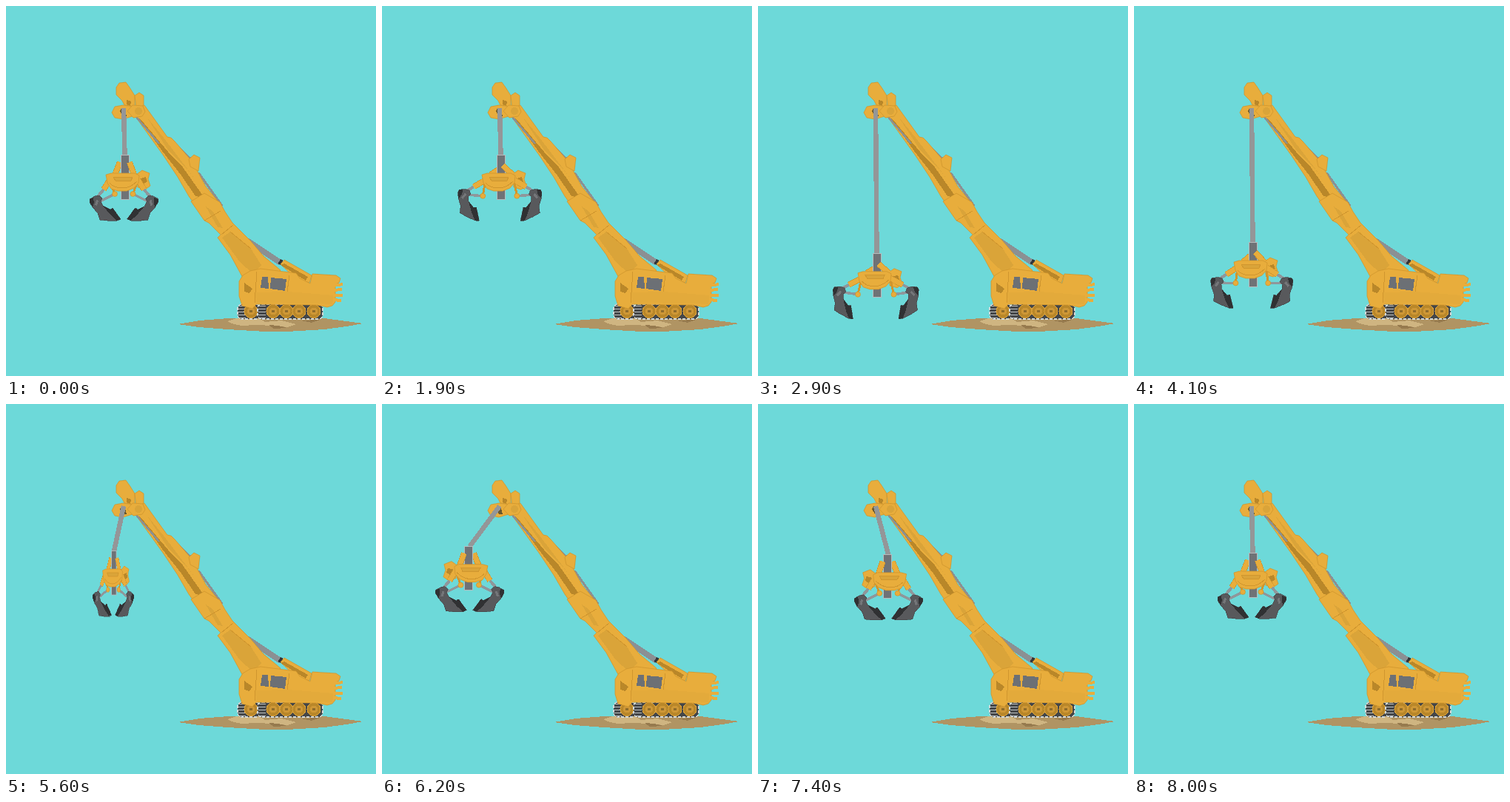
An HTML page for the animation above (9 s loop, 500 by 500 pixels).

```html
<!DOCTYPE html>
<html lang="en">
<head>
<meta charset="utf-8">
<title>Grab crane</title>
<style>
  html, body { margin: 0; width: 100%; height: 100%; overflow: hidden; background: #6dd9d9; }
  svg { display: block; width: 100vw; height: 100vh; shape-rendering: crispEdges; }
  .y { fill: #e8ad3c; stroke: #d0962e; stroke-width: .8; stroke-linejoin: round; }
  .s { fill: #daa439; }
  .d { fill: #b98729; }
  .steel { fill: #6c7075; }
  .line { fill: none; stroke: #8b9093; }
  .edge { fill: none; stroke: #d0962e; }
</style>
</head>
<body>
<svg viewBox="0 0 500 500">
  <g id="ground">
    <path fill="#b09463" d="M232 430 262 425 300 422H430L460 426 483 429 460 433 430 437 380 440H350L300 437 260 434Z"/>
    <path fill="#cfb581" d="M299 426 312 422H342L350 427 372 425 392 430 380 434 362 432 338 431 318 432 305 429Z"/>
    <path fill="#967a4e" d="M355 431 368 432 380 435 362 436ZM398 425 424 424 413 428Z"/>
  </g>

  <g id="head">
    <path class="y" d="M149 110 153 104 162 103 167 110 174 121 174 136 160 134 157 128 149 120Z"/>
    <path class="y" d="M174 121 180 117 186 121V137L176 139Z"/>
    <path class="d" d="M163 127 169 129 168 135 163 133Z"/>
    <path class="y" d="M143 144 147 136 158 134 174 136 171 149 158 153 147 151Z"/>
    <path fill="#6a592f" d="M156 138 161 141 163 149 158 149 154 142Z"/>
  </g>
  <path id="cable" fill="none" stroke="#949698" stroke-width="6.5"/>

  <g id="boom">
    <path class="line" stroke-width="3" d="M229 187 250 207M260 225 292 270"/>
    <path class="y" d="M180 137 187 134 218 177 223 178 229 184 248 206 258 222 270 244 290 268 274 276 252 264 247 257 232 231 212 201 176 151Z"/>
    <path class="d" d="M180 152 187 159 219 197 239 218 263 252 269 259 256 257 237 229 211 196Z"/>
    <path class="s" d="M190 150 213 178 248 224 258 238 246 222 220 196Z"/>
    <path class="line" stroke-width="2.5" d="M176 150 207 186"/>
    <path class="y" d="M247 207 254 201 262 205 260 223 249 217Z"/>
    <path class="y" d="M164 142 171 134 185 135 188 143 184 149 172 151Z"/>
    <circle class="s" cx="179" cy="142" r="5"/>

    <path class="line" stroke-width="8" d="M326 317 371 347"/>
    <path stroke="#34373a" stroke-width="4" d="M369 349 373 343"/>
    <path class="y" d="M371 349 376 343 413 364 410 374 390 367Z"/>
    <path class="d" d="M371 350 376 348 408 366 405 371Z"/>

    <path class="y" d="M250 264 268 253 289 265 296 278 306 293 331 318 348 338 371 357 358 370 332 389 321 369 303 336 286 313 290 309 274 293 268 290Z"/>
    <path class="s" d="M292 313 303 305 331 328 345 350 334 362 316 346Z"/>
    <path class="s" d="M270 271 279 277 293 300 286 299Z"/>
    <path class="edge" d="M268 290 290 277M291 309 307 296M303 305 331 328"/>
  </g>

  <g id="tracks"></g>

  <g id="body">
    <path class="y" d="M315 392V372L320 364 330 358 344 355 392 361 397 368 411 375 414 362 446 364 452 368 450 374 445 376V400L441 405 434 407 420 404 338 403 333 409 319 405Z"/>
    <path class="s" d="M337 387 381 386 443 391 441 403 420 402 338 401Z" opacity=".35"/>
    <path class="d" d="M322 374 333 382 329 388 322 386Z"/>
    <path class="edge" d="M339 359 336 401M383 364 380 386"/>
    <path fill="none" stroke="#e8ad3c" stroke-width="4" d="M442 378 455 376M442 384 454 383M442 391 455 391M442 397 453 398"/>
    <path class="steel" d="M346 366H354L355 382 344 381ZM358 367 379 369 377 385 357 382Z"/>
  </g>

  <g id="grab">
    <path class="y" d="M17 26 24 21 34 25 32 33 35 42 28 47 18 44Z"/>
    <path class="d" d="M22 32 29 30 31 36 25 40Z"/>
    <g id="left"></g>
    <g id="right" transform="translate(-1.5) scale(-1 1)"></g>
    <g id="backBrace"></g>
    <path fill="#6f7276" stroke="#b7bbbd" d="M-5 .5H6V60H-5Z"/>
    <g id="frontBrace"></g>
    <path class="y" d="M-25 27-18 25H14L20 28 19 38 13 45 3 49H-9L-18 46-23 38Z"/>
    <path class="s" d="M-15 30H11L9 35H-12Z"/>
    <path class="edge" d="M-15 30H11L9 35H-12ZM-20 38Q-14 45-3 45T17 36"/>
  </g>
</svg>
<script>
const $ = id => document.getElementById(id);
const LOOP = 9000, STEP = 100;

// time, x, y, horizontal turn, jaw opening
const keys = [
  [0, 160, 0, 1, 0],
  [1000, 160, 0, 1, 0],
  [2000, 160, 0, 1, 1],
  [3000, 160, 147.5, 1, 1],
  [4000, 160, 147.5, 1, 1],
  [4500, 160, 0, 1, 0],
  [5500, 160, 0, 1, 0],
  [6000, 87.5, -15, -1, 0],
  [6500, 163.5, -1, -1, 0],
  [7000, 243.5, 1, -1, 0],
  [7500, 158.7, 2, -1, 0],
  [8000, 160, 0, 1, 0],
  [9000, 160, 0, 1, 0]
];

const mix = (a, b, k) => a + (b - a) * k;
const mixPoint = (a, b, k) => a.map((v, i) => mix(v, b[i], k));

function pose(t) {
  const i = keys.findIndex(k => k[0] > t);
  const a = keys[i - 1], b = keys[i];
  return mixPoint(a, b, (t - a[0]) / (b[0] - a[0])).slice(1);
}

const bar = (a, b, color, width) =>
  `<path d="M${a}L${b}" fill="none" stroke="${color}" stroke-width="${width}"/>`;

const beam = (a, b) => bar(a, b, '#d0962e', 8) + bar(a, b, '#e8ad3c', 6.5);

function jaw(open) {
  const pivot = mixPoint([-40, 61], [-51, 50], open);
  const elbow = mixPoint([-28, 47], [-37, 43], open);
  const knob = mixPoint([-13, 53], [-25, 56], open);
  const shoulder = [-20, 34];
  const hinge = [pivot[0] + 5, pivot[1] + 3];
  return bar(elbow, pivot, '#8f979b', 4) +
    bar(knob, hinge, '#8f979b', 3.5) +
    bar(shoulder, knob, '#d0962e', 3) +
    beam(shoulder, elbow) +
    `<circle class="y" cx="${knob[0]}" cy="${knob[1]}" r="3.5"/>
    <g transform="translate(${pivot}) rotate(${27 * open})">
      <path fill="#58595c" stroke="#434447" stroke-width=".7" d="M-7 3-7-1 0-5 6-6 10-2 8 2 11 8 21 13 24 11 35 26 30 28 17 28 7 27 4 18-3 10Z"/>
      <path fill="#303133" d="M11 8 21 13 24 11 35 26 30 28 22 21ZM-7 3-7-1-2-3-1 4-3 10Z"/>
      <path fill="#747679" d="M2 0 5 1 3 8 0 7Z"/>
    </g>`;
}

function track(x, width, wheels) {
  const treads = [0, 1, 2, 3, 4].map(i =>
    bar([x + 1, 406 + i * 4], [x + 11, 405 + i * 4], '#b9bdbe', 1)).join('');
  const hubs = wheels.map(cx =>
    `<circle cx="${cx}" cy="412.5" r="9" fill="#b98729" stroke="#d9a03a"/>
     <circle cx="${cx}" cy="412.5" r="5" fill="#ce9736"/>
     <circle cx="${cx}" cy="412.5" r="2" fill="#8f6c2b"/>`).join('');
  return `<rect x="${x}" y="403" width="${width}" height="20" rx="6" fill="#444648"/>
    <rect x="${x}" y="403" width="${width}" height="20" rx="6" fill="none"
      stroke="#d1d7d7" stroke-width="1.5" stroke-dasharray="4 2"/>` + treads + hubs;
}

$('tracks').innerHTML = track(313, 30, [331]) + track(340, 88, [361, 379, 396, 416]);

function draw(now) {
  const t = Math.floor(now % LOOP / STEP) * STEP;
  const [x, y, turn, open] = pose(t);
  $('cable').setAttribute('d', `M159 138L${x + .5} ${202 + y}`);
  $('grab').setAttribute('transform', `translate(${x} ${201 + y}) scale(${turn} 1)`);
  $('left').innerHTML = $('right').innerHTML = jaw(open);
  $('backBrace').innerHTML = beam(mixPoint([-6, 10], [-1, 20], open), [-13, 27]);
  $('frontBrace').innerHTML = beam(mixPoint([7, 10], [3, 15], open), mixPoint([13, 27], [17, 27], open));
}

let start;
function tick(now) {
  start ??= now;
  draw(now - start);
  requestAnimationFrame(tick);
}
draw(0);
requestAnimationFrame(tick);
</script>
</body>
</html>
```
